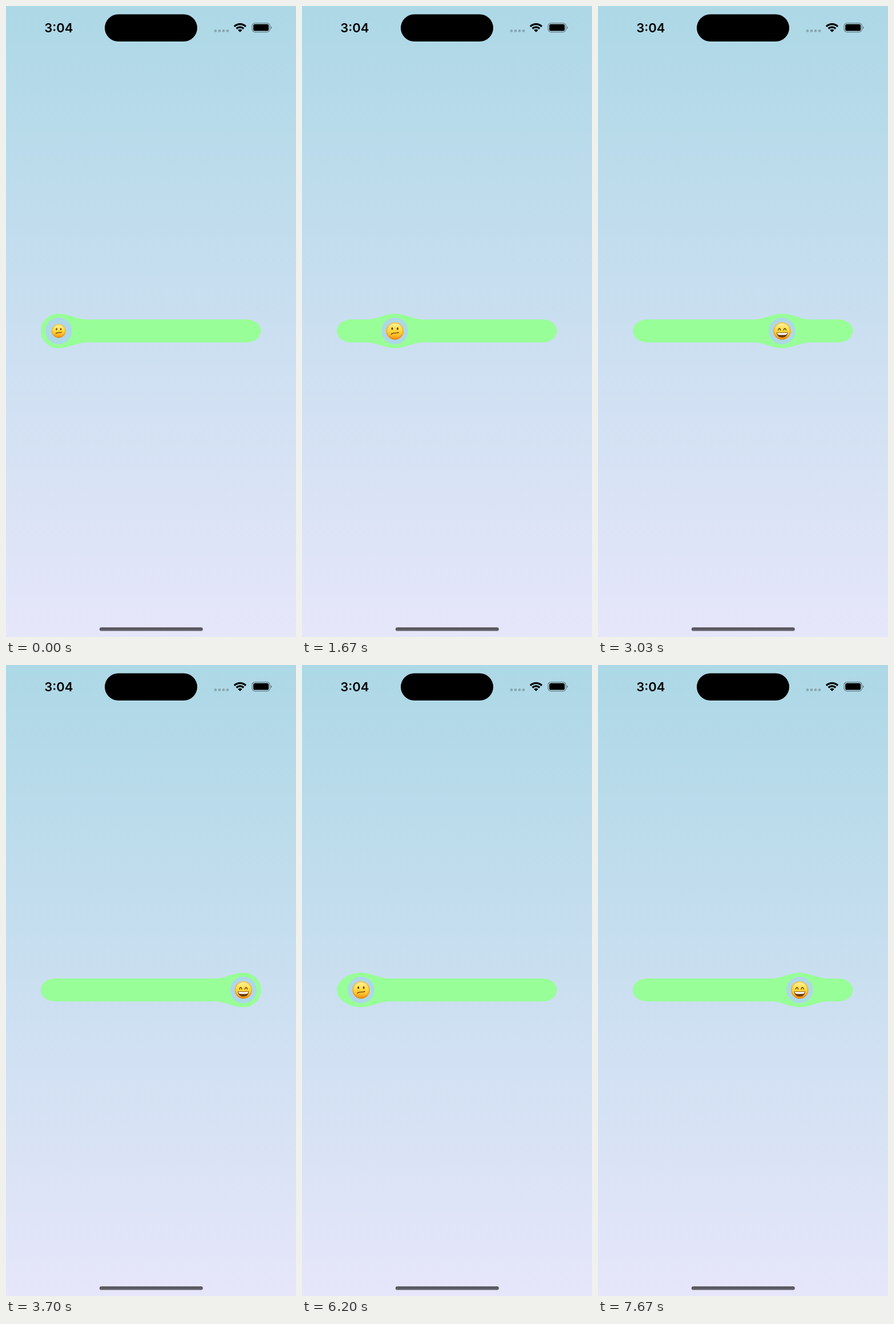
An HTML page that plays this animation: 508 px wide and 1102 px high, repeating every 8 s.

```html
<!DOCTYPE html>
<html lang="en">
<head>
<meta charset="utf-8">
<title>Mood slider</title>
<style>
  html, body { margin: 0; width: 100%; height: 100%; overflow: hidden; }
  svg { display: block; width: 508px; height: 1102px; background: linear-gradient(#add8e6, #e6e6fa); }
  text { font: 600 22px Inter, sans-serif; }
  .line { fill: none; stroke: #6b3a0c; stroke-width: 1.4; stroke-linecap: round; }
  .eyes { fill: #6b3a0c; }
</style>
</head>
<body>
<svg viewBox="0 0 508 1102">
  <defs>
    <linearGradient id="skin" x1="0" y1="0" x2="0" y2="1">
      <stop offset="0" stop-color="#fff6a6"/>
      <stop offset=".4" stop-color="#ffe04a"/>
      <stop offset=".7" stop-color="#ffc32b"/>
      <stop offset="1" stop-color="#f58a12"/>
    </linearGradient>
    <radialGradient id="rim">
      <stop offset=".8" stop-color="#d9780a" stop-opacity="0"/>
      <stop offset="1" stop-color="#d9780a" stop-opacity=".55"/>
    </radialGradient>
    <linearGradient id="home" x1="0" y1="0" x2="0" y2="1">
      <stop offset="0" stop-color="#4e4d55"/>
      <stop offset="1" stop-color="#696872"/>
    </linearGradient>
  </defs>

  <text x="92.3" y="46" text-anchor="middle">3:04</text>
  <rect x="173" y="14.5" width="162" height="47.5" rx="23.75"/>
  <path d="M367 43.4h0m7 0h0m7 0h0m7 0h0" stroke="#000" stroke-opacity=".23" stroke-width="4.8" stroke-linecap="round"/>
  <g transform="translate(410 45.8)">
    <path d="M0 0L-3.8 -3.8A5.4 5.4 0 0 1 3.8 -3.8Z"/>
    <path d="M-6.3 -6.3A8.95 8.95 0 0 1 6.3 -6.3M-10 -10A14.2 14.2 0 0 1 10 -10" fill="none" stroke="#000" stroke-width="3.3"/>
  </g>
  <rect x="431.2" y="29.8" width="31" height="15.8" rx="5" fill="none" stroke="#000" stroke-opacity=".42" stroke-width="1.3"/>
  <rect x="433.2" y="31.8" width="27" height="11.8" rx="3.2"/>
  <path d="M464 35.2a2.8 2.8 0 0 1 0 5z" fill-opacity=".5"/>

  <path id="track" fill="#98fe97"/>
  <g id="knob">
    <circle r="23.2" fill="#add8e8"/>
    <g id="face">
      <circle r="15.2" fill="url(#skin)"/>
      <circle r="15.2" fill="url(#rim)"/>
      <g class="mood">
        <g class="eyes"><ellipse cx="-4.7" cy="-4" rx="1.5" ry="2.3"/><ellipse cx="4.7" cy="-4" rx="1.5" ry="2.3"/></g>
        <path class="line" d="M-6.4 5.8C-3 1.6 2 5.2 6.5 2.6"/>
      </g>
      <g class="mood">
        <g class="eyes"><ellipse cx="-4.5" cy="-3.6" rx="1.5" ry="2.6"/><ellipse cx="4.5" cy="-3.6" rx="1.5" ry="2.6"/></g>
        <path class="line" d="M-6.6 4.4H6.6"/>
      </g>
      <g class="mood">
        <path class="line" d="M-7 -1.5Q-4.8 -7.5 -2.6 -1.5M2.6 -1.5Q4.8 -7.5 7 -1.5"/>
        <path d="M-9.8 2.2Q0 3.8 9.8 2.2Q8.8 11.5 0 11.5T-9.8 2.2Z" fill="#6b3a0c"/>
        <path d="M-8.8 3Q0 4.6 8.8 3Q8.2 6.4 6.8 6.6Q0 7.6 -6.8 6.6Q-8.2 6.4 -8.8 3Z" fill="#fff"/>
      </g>
    </g>
  </g>

  <rect x="163.8" y="1085.3" width="181" height="6.2" rx="3.1" fill="url(#home)"/>
</svg>
<script>
const LOOP = 8000, MID = 567.5, LEFT = 61, RIGHT = 446.5;
const MIN = 92.3, MAX = 415.8;
const CAP = 25, BAR = 20, BUMP = 10, REACH = 50;

// [time, knob x]
const drag = [
  [0, MIN], [470, MIN], [970, 109.3], [1300, 133], [2150, 201], [2370, 224.7],
  [2970, 314], [3700, MAX], [4670, MAX], [5030, 229], [5270, MIN],
  [6170, MIN], [6200, 103.2], [6600, 208], [7000, 290], [7670, 353.3], [LOOP, 353.3]
];

const byId = id => document.getElementById(id);
const track = byId('track'), knob = byId('knob'), face = byId('face');
const moods = document.querySelectorAll('.mood');

function knobX(t) {
  const i = drag.findIndex(k => k[0] > t);
  const [t0, x0] = drag[i - 1], [t1, x1] = drag[i];
  return x0 + (x1 - x0) * (t - t0) / (t1 - t0);
}

// Half the track's thickness at u: rounded bar plus a swell around the knob
function halfHeight(u, x) {
  const inset = Math.max(0, 1 - Math.min(u - LEFT, RIGHT - u) / CAP);
  const d = Math.min(1, Math.abs(u - x) / REACH);
  return BAR * Math.sqrt(1 - inset * inset) + BUMP * Math.cos(d * Math.PI / 2) ** 2;
}

function trackPath(x) {
  const top = [], bottom = [];
  for (let u = LEFT; u <= RIGHT; u += 0.5) {
    const h = halfHeight(u, x);
    top.push(`${u} ${(MID - h).toFixed(2)}`);
    bottom.unshift(`${u} ${(MID + h).toFixed(2)}`);
  }
  return `M${top.join('L')}L${bottom.join('L')}Z`;
}

function draw(t) {
  const x = knobX(t);
  const grow = Math.min(1, Math.max(0, (t - 500) / 300));
  const scale = 0.8 + 0.2 * (1 - (1 - grow) ** 2);
  const mood = Math.min(2, Math.floor((x - MIN) / (MAX - MIN) * 3));
  track.setAttribute('d', trackPath(x));
  knob.setAttribute('transform', `translate(${x} ${MID})`);
  face.setAttribute('transform', `scale(${scale})`);
  moods.forEach((m, i) => m.style.display = i === mood ? '' : 'none');
}

const start = performance.now();
function tick() {
  draw((performance.now() - start) % LOOP);
  requestAnimationFrame(tick);
}
tick();
</script>
</body>
</html>
```
